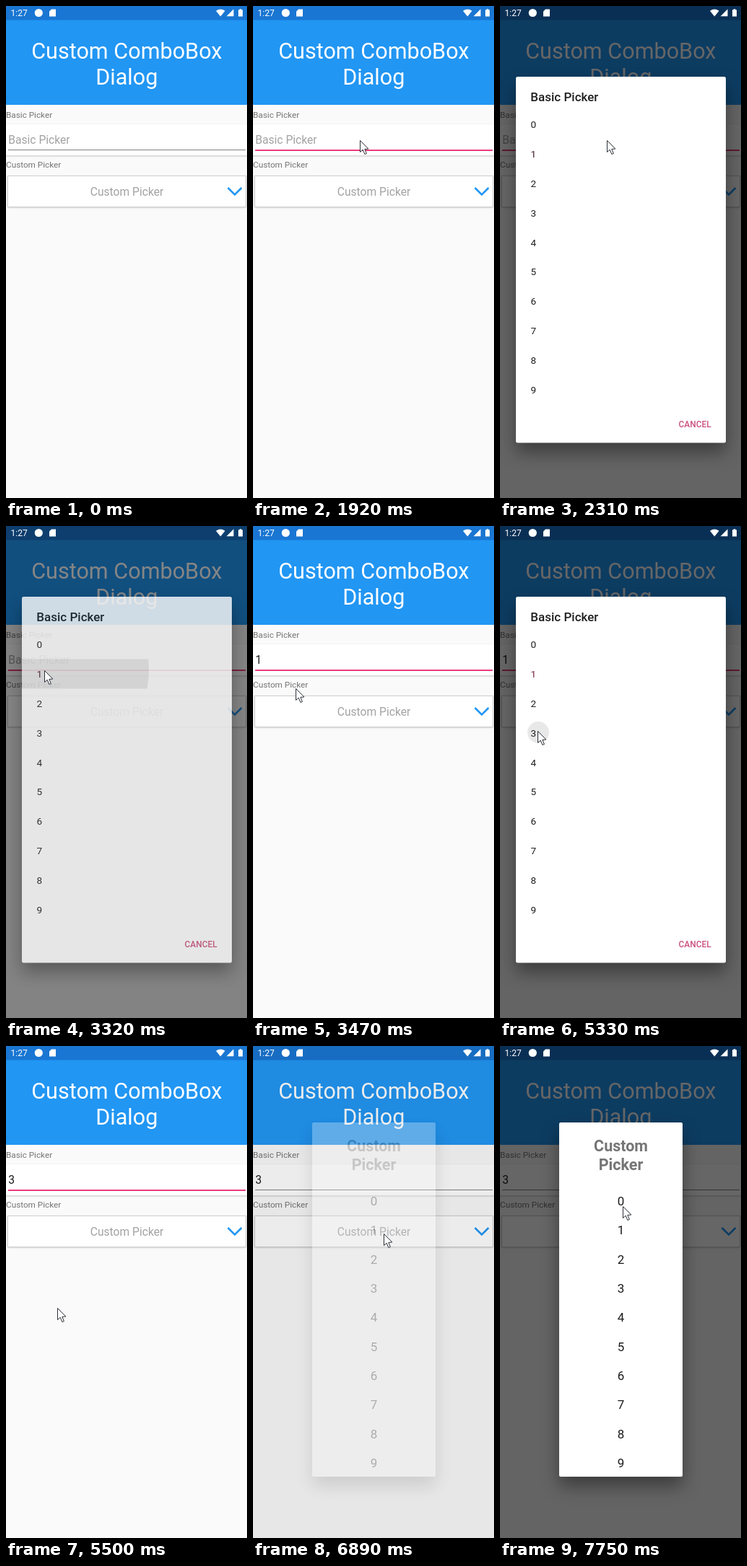
An HTML page with a canvas that plays this animation: 334 px wide and 682 px high, repeating every 8 s.

```html
<!DOCTYPE html>
<html lang="en">
<head>
<meta charset="utf-8">
<title>Custom ComboBox Dialog</title>
<style>
  html, body { margin: 0; width: 100%; height: 100%; overflow: hidden; background: #fafafa; }
  canvas { display: block; width: 334px; height: 682px; }
</style>
</head>
<body>
<canvas id="stage"></canvas>
<script>
const W = 334, H = 682, LOOP = 8000;
const TICK = 77.6, START = 132; // screen refreshes about 13 times a second
const PINK = '#ea3b7d', BLUE = '#2196f3';
const dpr = window.devicePixelRatio || 1;

const stage = document.getElementById('stage');
const layer = document.createElement('canvas');
for (const c of [stage, layer]) {
  c.width = W * dpr;
  c.height = H * dpr;
  c.getContext('2d').scale(dpr, dpr);
}
const screen = stage.getContext('2d');
const sheet = layer.getContext('2d');

// Pointer path: tick, x, y
const path = [
  [0, 226, 615], [8, 148, 186], [30, 148, 186], [34, 57, 229], [35, 57, 229],
  [39, 53, 200], [41, 53, 200], [43, 59, 225], [48, 65, 206], [54, 65, 206],
  [60, 53, 283], [61, 52, 284], [67, 52, 284], [69, 71, 363], [70, 73, 380],
  [71, 73, 380], [80, 181, 260], [89, 181, 260], [93, 163, 239], [94, 163, 239],
  [98, 170, 222]
];

// Dialog visits: opening and closing ticks, tapped row
const visits = [
  { draw: basicDialog, open: 24.7, close: 40.5, tap: 39, row: 1, x: 53, y: 200 },
  { draw: basicDialog, open: 49.7, close: 66.5, tap: 65, row: 3, x: 53, y: 286 },
  { draw: customDialog, open: 86.6, close: Infinity, tap: Infinity }
];

const clamp = v => Math.max(0, Math.min(1, v));
const smooth = p => p * p * (3 - 2 * p);

function text(g, str, x, y, size, color, align = 'left', weight = 400) {
  g.font = `${weight} ${size}px Roboto, "Noto Sans", sans-serif`;
  g.textAlign = align;
  g.fillStyle = color;
  g.fillText(str, x, y);
}

function rect(g, color, x, y, w, h) {
  g.fillStyle = color;
  g.fillRect(x, y, w, h);
}

function poly(g, points, close = true) {
  g.beginPath();
  points.forEach(([x, y]) => g.lineTo(x, y));
  if (close) g.closePath();
}

function shadow(g, color, blur, dy) {
  g.shadowColor = color;
  g.shadowBlur = blur * dpr;
  g.shadowOffsetY = dy * dpr;
}

function card(g, x, y, w, h, r, color, blur, dy) {
  g.save();
  shadow(g, color, blur, dy);
  g.fillStyle = '#fff';
  g.beginPath();
  g.roundRect(x, y, w, h, r);
  g.fill();
  g.restore();
}

function statusIcons(g) {
  text(g, '1:27', 6.5, 14, 12, '#fff');
  g.fillStyle = '#fff';
  g.beginPath();
  g.arc(45.3, 9.5, 5.6, 0, 7);
  g.fill();
  poly(g, [[63, 4.5], [69, 4.5], [69, 14.5], [60, 14.5], [60, 7.5]]);
  g.fill();
  g.beginPath();
  g.moveTo(297.3, 14.5);
  g.lineTo(291, 6.8);
  g.quadraticCurveTo(297.3, 2, 303.6, 6.8);
  g.fill();
  poly(g, [[315.5, 4.3], [315.5, 14.2], [305.6, 14.2]]);
  g.fill();
  g.fillRect(322, 5.3, 6, 9.2);
  g.fillRect(323.7, 4.2, 2.6, 1.5);
}

function page(g, n) {
  rect(g, '#fafafa', 0, 0, W, H);
  rect(g, BLUE, 0, 19, W, 118);
  rect(g, '#1976d2', 0, 0, W, 19.5);
  text(g, 'Custom ComboBox', 167.3, 73, 30.6, '#fff', 'center');
  text(g, 'Dialog', 167.3, 109, 30.6, '#fff', 'center');

  text(g, 'Basic Picker', 0, 155.3, 11.75, '#757575');
  card(g, -4, 164, W + 8, 43, 0, 'rgba(0,0,0,.22)', 2.5, 0.6);
  const value = n >= 69 ? '3' : n >= 43 ? '1' : '';
  text(g, value || 'Basic Picker', 3.2, 191, 15.65, value ? '#1c1c1c' : '#a2a2a2');
  const focused = n >= 23 && n < 84;
  rect(g, focused ? PINK : '#808080', 3, 199, 329, focused ? 2 : 1);

  text(g, 'Custom Picker', 0, 224.3, 11.75, '#757575');
  card(g, 2.5, 235.5, 330, 43, 1, 'rgba(0,0,0,.28)', 2.5, 0.8);
  g.strokeStyle = '#cfcfcf';
  g.lineWidth = 1;
  g.strokeRect(2.5, 235.5, 330, 43);
  text(g, 'Custom Picker', 167.5, 263, 15.65, '#a2a2a2', 'center');
  poly(g, [[307.5, 252], [317, 261.5], [326.5, 252]], false);
  g.strokeStyle = BLUE;
  g.lineWidth = 2.5;
  g.stroke();
}

function ripple(g, n, v) {
  if (n < v.tap) return;
  const grow = clamp((n - v.tap - 1) / 2);
  g.save();
  g.beginPath();
  g.rect(22, 143.7 + v.row * 40.9, 291, 40.9);
  g.clip();
  g.fillStyle = 'rgba(0,0,0,.09)';
  g.beginPath();
  g.arc(v.x, v.y, 15 + 260 * grow, 0, 7);
  g.fill();
  g.restore();
}

function basicDialog(g, n, v) {
  card(g, 22, 98, 291, 507.5, 2.5, 'rgba(0,0,0,.4)', 24, 13);
  ripple(g, n, v);
  text(g, 'Basic Picker', 42.2, 131.5, 17, '#1f1f1f', 'left', 500);
  for (let i = 0; i < 10; i++) {
    const tint = i !== 1 ? '#1f1f1f' : n < 49 ? '#43202c' : '#7d2844';
    text(g, String(i), 42.6, 168.9 + i * 40.9, 13.6, tint);
  }
  text(g, 'CANCEL', 292.6, 584.2, 11.9, '#cb527f', 'right', 500);
}

function customDialog(g) {
  card(g, 82, 106, 171, 491, 2, 'rgba(0,0,0,.4)', 24, 13);
  text(g, 'Custom', 167.5, 146.4, 21.5, '#757575', 'center', 700);
  text(g, 'Picker', 167.5, 171.5, 21.5, '#757575', 'center', 700);
  for (let i = 0; i < 10; i++) {
    text(g, String(i), 167.5, 221 + i * 40.35, 17, '#1a1a1a', 'center');
  }
}

function pointer(g, n) {
  if (n < 0) return;
  let [, x, y] = path[path.length - 1];
  const i = path.findIndex(k => k[0] > n);
  if (i > 0) {
    const [t0, x0, y0] = path[i - 1], [t1, x1, y1] = path[i];
    const p = smooth((n - t0) / (t1 - t0));
    x = x0 + (x1 - x0) * p;
    y = y0 + (y1 - y0) * p;
  }
  g.save();
  g.translate(x + 0.5, y + 0.5);
  poly(g, [[0, 0], [0, 16], [3.7, 12.7], [6.4, 19], [8.9, 18], [6.3, 11.9], [11.4, 11.5]]);
  g.fillStyle = '#fff';
  g.strokeStyle = '#2b3038';
  g.lineWidth = 1;
  g.lineJoin = 'round';
  g.fill();
  g.stroke();
  g.restore();
}

function render(ms) {
  const n = Math.floor((ms - START) / TICK);
  page(screen, n);
  const v = visits.find(d => n >= d.open && n < d.close + 2.5);
  if (v) {
    const out = 1 - clamp((n - v.close) / 2.5);
    const fade = clamp((n - v.open) / 2.58);
    rect(screen, `rgba(0,0,0,${0.6 * out * clamp((n - v.open) / 3.22)})`, 0, 0, W, H);
    sheet.clearRect(0, 0, W, H);
    v.draw(sheet, n, v);
    screen.globalAlpha = out * (1 - (1 - fade) ** 2);
    screen.drawImage(layer, 0, 0, W, H);
    screen.globalAlpha = 1;
  }
  statusIcons(screen);
  pointer(screen, n);
}

const begin = performance.now();
function loop() {
  render((performance.now() - begin) % LOOP);
  requestAnimationFrame(loop);
}
loop();
</script>
</body>
</html>
```
